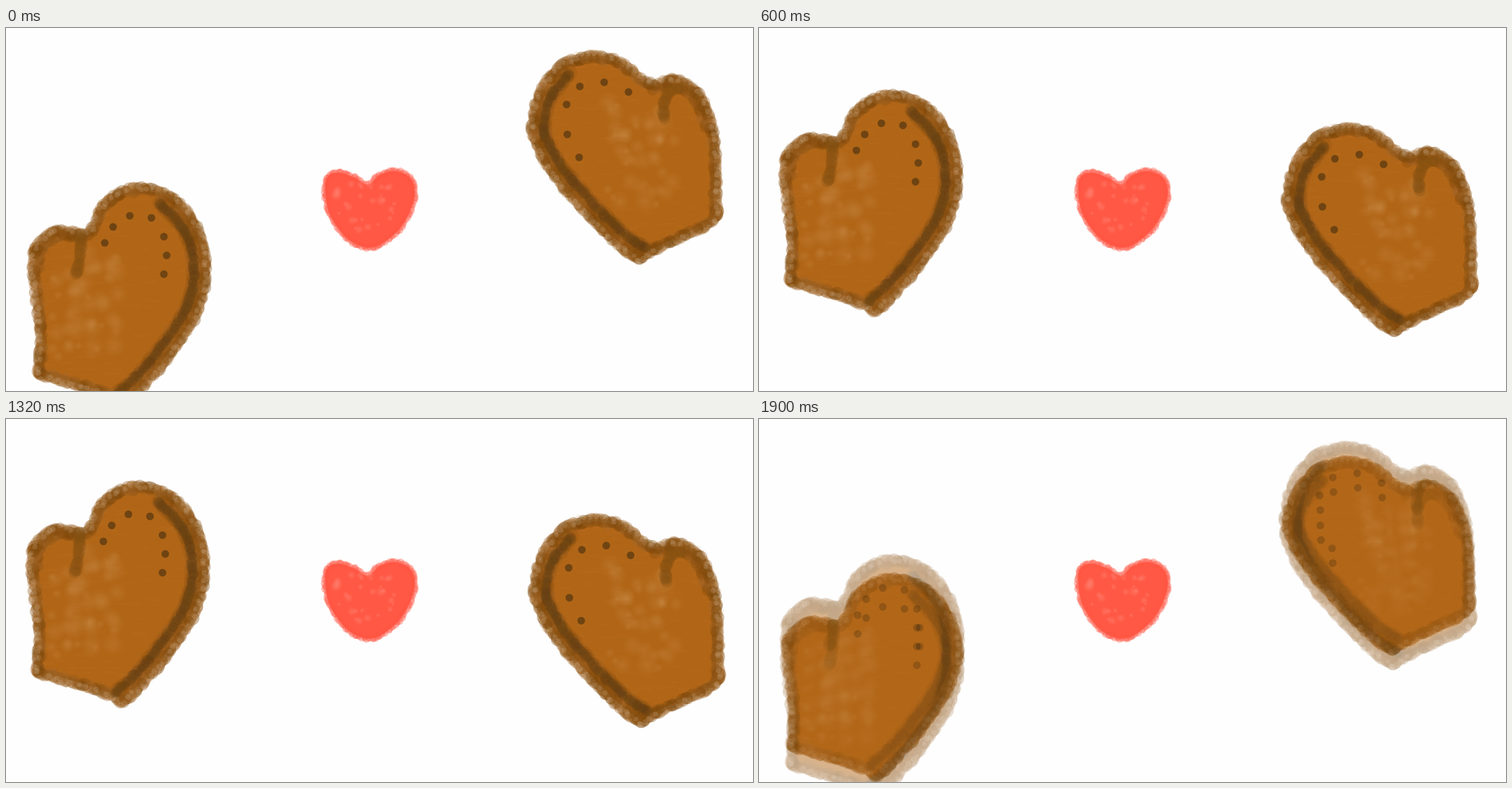
An HTML page with a canvas that plays this animation: 1074 by 522 pixels, repeating every 1.92 s.

```html
<!DOCTYPE html>
<html lang="en">
<head>
<meta charset="utf-8">
<title>Mittens and heart</title>
<style>
  html, body { margin: 0; width: 100%; height: 100%; overflow: hidden; background: #fefefe; }
  canvas { display: block; }
</style>
</head>
<body>
<canvas id="stage" width="1074" height="522"></canvas>
<script>
const W = 1074, H = 522;
const ctx = document.getElementById('stage').getContext('2d');

let seed = 7;
const rnd = () => (seed = (seed * 16807) % 2147483647) / 2147483647;
const spread = d => (rnd() - 0.5) * 2 * d;
const pick = list => list[Math.floor(rnd() * list.length)];

function sprite(paint) {
  const c = document.createElement('canvas');
  c.width = W;
  c.height = H;
  paint(c.getContext('2d'));
  return c;
}

const parse = text => text.split(' ').map(p => p.split(',').map(Number));

// Samples a Catmull-Rom curve, moved inwards by `inset` (clockwise points).
function curve(pts, step, inset = 0, closed = true) {
  const n = pts.length, out = [];
  const at = i => pts[closed ? (i + n) % n : Math.max(0, Math.min(n - 1, i))];
  for (let i = 0; i < (closed ? n : n - 1); i++) {
    const [a, b, c, d] = [at(i - 1), at(i), at(i + 1), at(i + 2)];
    const count = Math.ceil(Math.hypot(c[0] - b[0], c[1] - b[1]) / step);
    for (let s = 0; s < count; s++) {
      const t = s / count;
      const k1 = k => c[k] - a[k];
      const k2 = k => 2 * a[k] - 5 * b[k] + 4 * c[k] - d[k];
      const k3 = k => 3 * (b[k] - c[k]) + d[k] - a[k];
      const pos = k => b[k] + t / 2 * (k1(k) + t * (k2(k) + t * k3(k)));
      const vel = k => k1(k) + t * (2 * k2(k) + 3 * t * k3(k));
      const vx = vel(0), vy = vel(1), len = Math.hypot(vx, vy) || 1;
      out.push([pos(0) - vy / len * inset, pos(1) + vx / len * inset]);
    }
  }
  return out;
}

function dab(g, x, y, r, rgb, alpha) {
  g.fillStyle = `rgba(${rgb},${alpha})`;
  g.beginPath();
  g.arc(x, y, r, 0, 7);
  g.fill();
}

function brush(g, points, r, colours, alpha, jitter = 1.5) {
  for (const [x, y] of points) {
    dab(g, x + spread(jitter), y + spread(jitter), r * (0.8 + rnd() * 0.3), pick(colours), alpha);
  }
}

function fillShape(g, points, colour) {
  g.beginPath();
  points.forEach(p => g.lineTo(...p));
  g.closePath();
  g.fillStyle = colour;
  g.fill();
}

// Worn, lighter patches: soft dabs scattered around a centre.
function cloud(g, [x, y], w, h, count, size, rgb, alpha) {
  for (let i = 0; i < count; i++) {
    const cx = x + spread(w), cy = y + spread(h), r = size * (0.4 + rnd());
    const soft = g.createRadialGradient(cx, cy, 0, cx, cy, r);
    soft.addColorStop(0, `rgba(${rgb},${alpha})`);
    soft.addColorStop(1, `rgba(${rgb},0)`);
    g.fillStyle = soft;
    g.fillRect(cx - r, cy - r, 2 * r, 2 * r);
  }
}

const BROWNS = ['126,73,10', '148,88,24', '138,80,16', '160,102,42'];
const DARK = ['104,66,20', '96,60,18'];
const PALE = ['214,184,150'];

// `cuff` and `thumb` are [first, end) ranges of outline points.
function mitten({ outline, cuff, thumb, slit, dots, worn }) {
  const part = ([from, to], step, inset) => curve(outline.slice(from, to), step, inset, false);
  return sprite(g => {
    const body = curve(outline, 4, 9);
    fillShape(g, body, 'rgb(177,102,23)');
    g.save();
    g.clip();
    cloud(g, worn, 50, 75, 45, 13, '210,155,95', 0.2);
    for (let i = 0; i < 500; i++) {
      const [x, y] = pick(body), [u, v] = pick(body), k = rnd();
      g.fillStyle = pick(['rgba(195,125,52,.06)', 'rgba(160,88,14,.06)']);
      g.fillRect(x + (u - x) * k, y + (v - y) * k, 8 + rnd() * 16, 1 + rnd() * 3);
    }
    g.restore();

    brush(g, part(cuff, 4, 22), 12, BROWNS, 0.16);
    brush(g, part(thumb, 4, 15), 8, BROWNS, 0.28);
    brush(g, curve(outline, 4, 6.5), 9, BROWNS, 0.36);
    brush(g, curve(outline, 7, 8.5), 8.5, BROWNS, 0.36, 2.5);
    brush(g, curve(outline, 9, 4), 4, PALE, 0.2, 4);
    brush(g, curve(slit, 3, 0, false), 9, ['138,82,18', '130,78,20'], 0.3, 1);
    brush(g, part(cuff, 3, 22.5), 7.5, DARK, 0.25);
    for (const [x, y] of dots) dab(g, x, y, 5.5, '108,66,18', 0.95);
  });
}

const leftMitten = mitten({
  outline: parse('39,366 40,345 41,300 31,210 38,176 70,152 112,156 133,119 178,92 235,103 275,148 ' +
    '291,210 278,278 240,338 205,380 170,412 148,403 100,387 58,375'),
  cuff: [9, 16],
  thumb: [3, 7],
  slit: parse('106,164 104,195 99,222'),
  dots: parse('140,176 152,153 176,137 207,140 225,167 229,194 225,221'),
  worn: [115, 265]
});

const rightMitten = mitten({
  outline: parse('840,139 885,147 930,178 962,172 1000,193 1023,242 1029,300 1029,350 1030,375 ' +
    '1012,393 985,406 935,430 910,440 870,412 795,333 763,282 753,248 764,195 796,154'),
  cuff: [12, 19],
  thumb: [2, 6],
  slit: parse('972,191 957,194 948,212 948,236'),
  dots: parse('826,290 809,257 808,214 827,188 862,182 897,196'),
  worn: [915, 285]
});

const heart = sprite(g => {
  const outline = parse('455,235 459,212 478,204 504,212 520,221 535,208 560,202 585,214 591,245 ' +
    '570,290 530,319 492,309 463,272');
  fillShape(g, curve(outline, 3, 4), 'rgb(255,88,68)');
  brush(g, curve(outline, 3, 4), 5, ['255,88,68'], 0.38);
  cloud(g, [515, 258], 45, 38, 30, 6, '255,160,145', 0.3);
});

// Both hands swing to and fro: heights at a few of the poses 0 to 8, even steps between.
const BEATS = [0, 2, 3, 5, 8];
const LEFT = [133, 79, 48, 0, -52];
const RIGHT = [-104, -62, -45, 0, 85];

function height(list, pose) {
  const i = Math.max(1, BEATS.findIndex(b => b >= pose));
  const k = (pose - BEATS[i - 1]) / (BEATS[i] - BEATS[i - 1]);
  return Math.round(list[i - 1] + (list[i] - list[i - 1]) * k);
}

function drawPose(key, alpha) {
  const pose = 8 - Math.abs(8 - key % 16);
  ctx.globalAlpha = alpha;
  ctx.drawImage(heart, 0, 0);
  ctx.drawImage(leftMitten, Math.round(2 - pose / 2), height(LEFT, pose));
  ctx.drawImage(rightMitten, Math.round(pose / 2 - 2), height(RIGHT, pose));
}

// Each pose holds 100 ms, then mixes evenly with the next for 20 ms.
function frame() {
  const t = performance.now() % 1920, key = Math.floor(t / 120);
  ctx.globalCompositeOperation = 'lighter';
  ctx.clearRect(0, 0, W, H);
  if (t % 120 < 100) {
    drawPose(key, 1);
  } else {
    drawPose(key, 0.5);
    drawPose(key + 1, 0.5);
  }
  requestAnimationFrame(frame);
}
frame();
</script>
</body>
</html>
```
